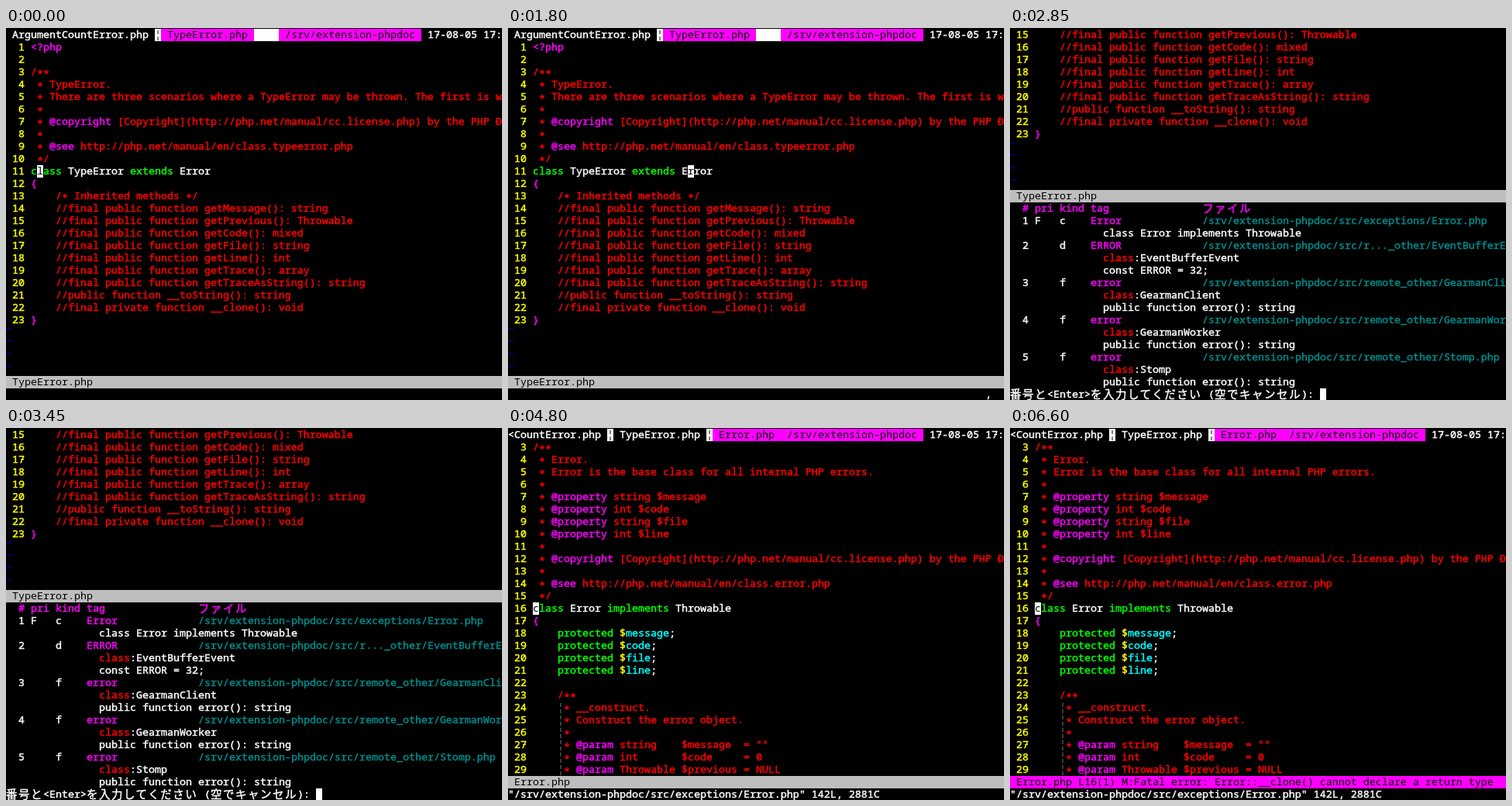
An HTML page that plays this animation: 640x480 px, repeating every 8100 ms.

```html
<!DOCTYPE html>
<html lang="ja">
<head>
<meta charset="utf-8">
<title>Tag jump in a terminal editor</title>
<style>
html, body { margin: 0; width: 100%; height: 100%; overflow: hidden; background: #000; }
#stage { position: absolute; left: 0; top: 0; width: 640px; height: 480px; overflow: hidden; background: #000; }
.screen { position: absolute; inset: 0; visibility: hidden; }
.run {
  position: absolute; height: 16px; white-space: pre;
  font: 400 13.3333px/14px "Noto Sans Mono", "DejaVu Sans Mono", monospace;
  font-variant-ligatures: none;
}
.light { -webkit-text-stroke: .45px currentColor; }
.wide { font: 400 14.5px/13px "Noto Sans CJK JP", "Noto Sans CJK", sans-serif; letter-spacing: 1.5px; }
.glyph { display: inline-block; position: relative; vertical-align: top; }
.low { top: 3px; }
.high { top: -4px; }
.seven { background: linear-gradient(currentColor, currentColor) 3px 7px / 4px 1px no-repeat; }
</style>
</head>
<body>
<div id="stage"></div>
<script>
const CELL = 8, ROW = 16, TOP = 1, LOOP = 8100;
const stage = document.getElementById('stage');

const INK = {
  w: '#fff', r: '#f00', m: '#f0f', y: '#ff0', g: '#0f0', c: '#0ff',
  t: '#008b8b', b: '#0000a0', d: '#555'
};
// Capital codes are black text on a filled background.
const FILL = { W: '#fff', M: '#f0f', S: '#bebebe' };
const GLYPHS = { '*': 'low', '~': 'high', '7': 'seven' };

function element(parent, className) {
  const node = document.createElement('div');
  node.className = className;
  parent.append(node);
  return node;
}

function fillGlyphs(node, text) {
  for (const part of text.split(/([*~7])/)) {
    if (!GLYPHS[part]) { node.append(part); continue; }
    const glyph = document.createElement('span');
    glyph.className = 'glyph ' + GLYPHS[part];
    glyph.textContent = part;
    node.append(glyph);
  }
}

const isWide = text => /[\u3000-\u9fff]/.test(text);

// Markup: "^g" switches to the colour with code g.
function put(screen, row, col, markup) {
  for (const [, code, body] of markup.matchAll(/\^(\w)([^^]*)/g)) {
    for (const text of body.match(/[\u3000-\u9fff]+|[^\u3000-\u9fff]+/g) || []) {
      const wide = isWide(text);
      const cells = text.length * (wide ? 2 : 1);
      const run = element(screen, wide ? 'run wide' : 'run');
      run.style.left = col * CELL + 'px';
      run.style.top = TOP + row * ROW + 'px';
      run.style.width = cells * CELL + 'px';
      run.style.color = INK[code] || '#000';
      if (FILL[code]) run.style.background = FILL[code];
      else run.classList.add('light');
      fillGlyphs(run, text);
      col += cells;
    }
  }
}

function listing(screen, lines, first, top) {
  lines.forEach((line, i) => {
    put(screen, top + i, 0, '^y' + String(first + i).padStart(3));
    put(screen, top + i, 4, line);
  });
}

function bar(screen, row, text, code = 'S') {
  put(screen, row, 0, '^' + code + (' ' + text).padEnd(80));
}

function tildes(screen, row) {
  for (let i = 0; i < 4; i++) put(screen, row + i, 0, '^b~');
}

const ROOT = '/srv/extension-phpdoc';
const CLOCK = `^M ${ROOT} ^w 17-08-05 17:`;
const COPYRIGHT = '^r * ^m@copyright^r [Copyright](http://php.net/manual/cc.license.php) by the PHP Ð';
const see = name => `^r * ^m@see^r http://php.net/manual/en/class.${name}.php`;
const comment = text => '^r * ' + text;
const property = text => `^r * ^m@property^r ${text}`;
const field = name => `^g    protected ^y$^c${name}^w;`;
const doc = text => '^w    ^d¦^r* ' + text;
const param = (type, name, value) =>
  doc('^m@param^r ' + type.padEnd(10) + name.padEnd(10) + '= ' + value);

const methods = [
  'final public function getMessage(): string',
  'final public function getPrevious(): Throwable',
  'final public function getCode(): mixed',
  'final public function getFile(): string',
  'final public function getLine(): int',
  'final public function getTrace(): array',
  'final public function getTraceAsString(): string',
  'public function __toString(): string',
  'final private function __clone(): void'
].map(text => '^r    //' + text);

function buildTypeError(screen) {
  put(screen, 0, 0, `^w ArgumentCountError.php ^W¦^M TypeError.php ^W    ${CLOCK}`);
  listing(screen, [
    '^m<?php', '', '^r/**',
    comment('TypeError.'),
    comment('There are three scenarios where a TypeError may be thrown. The first is w'),
    comment(''), COPYRIGHT, comment(''), see('typeerror'), '^r */',
    '^gclass ^wTypeError ^gextends ^wError', '^m{',
    '^r    /* Inherited methods */', ...methods, '^m}'
  ], 1, 1);
  tildes(screen, 24);
  bar(screen, 28, 'TypeError.php');
}

function buildTagList(screen) {
  listing(screen, [...methods.slice(1), '^m}'], 15, 0);
  tildes(screen, 9);
  bar(screen, 13, 'TypeError.php');
  put(screen, 14, 0, '^m  # pri kind tag');
  put(screen, 14, 31, '^mファイル');
  const signature = 'public function error(): string';
  const tags = [
    ['F', 'c', 'Error', 'exceptions/Error.php', '', 'class Error implements Throwable'],
    [' ', 'd', 'ERROR', 'r..._other/EventBufferE', 'EventBufferEvent', 'const ERROR = 32;'],
    [' ', 'f', 'error', 'remote_other/GearmanCli', 'GearmanClient', signature],
    [' ', 'f', 'error', 'remote_other/GearmanWor', 'GearmanWorker', signature],
    [' ', 'f', 'error', 'remote_other/Stomp.php', 'Stomp', signature]
  ];
  let row = 15;
  tags.forEach(([pri, kind, tag, path, owner, text], i) => {
    put(screen, row, 0, `^w  ${i + 1} ${pri}   ${kind}    ^m${tag}`);
    put(screen, row++, 31, `^t${ROOT}/src/${path}`);
    if (owner) put(screen, row++, 15, `^rclass^w:${owner}`);
    put(screen, row++, 15, '^w' + text);
  });
  put(screen, 29, 0, '^w番号と<Enter>を入力してください (空でキャンセル): ');
}

function buildError(screen) {
  put(screen, 0, 0, `^w<CountError.php ^W¦^w TypeError.php ^W¦^M Error.php ${CLOCK}`);
  listing(screen, [
    '^r/**', comment('Error.'),
    comment('Error is the base class for all internal PHP errors.'), comment(''),
    ...['string $message', 'int $code', 'string $file', 'int $line'].map(property),
    comment(''), COPYRIGHT, comment(''), see('error'), '^r */',
    '^gclass ^wError ^gimplements ^wThrowable', '^m{',
    ...['message', 'code', 'file', 'line'].map(field),
    '', '^r    /**', doc('__construct.'), doc('Construct the error object.'), doc(''),
    param('string', '$message', '""'),
    param('int', '$code', '0'),
    param('Throwable', '$previous', 'NULL')
  ], 3, 1);
  bar(screen, 28, 'Error.php');
  put(screen, 29, 0, `^w"${ROOT}/src/exceptions/Error.php" 142L, 2881C`);
}

function layer(build) {
  const node = element(stage, 'screen');
  build(node);
  return node;
}

const typeError = layer(buildTypeError);
const tagList = layer(buildTagList);
const error = layer(buildError);
const pendingKey = layer(s => put(s, 29, 77, '^w,'));
const answer = layer(s => put(s, 29, 50, '^w1'));
const warning = layer(s => bar(s, 28,
  'Error.php L16(1) M:Fatal error: Error::__clone() cannot declare a return type', 'M'));
const layers = [typeError, tagList, error, pendingKey, answer, warning];

const cursorAt = (row, col, char = ' ') => layer(s => put(s, row, col, '^W' + char));
const classLine = 'class TypeError extends Error';
const onClass = [5, 9, 14, 18, 22, 26, 29].map(col => cursorAt(11, col, classLine[col - 4]));
const prompt = cursorAt(29, 50);
const typed = cursorAt(29, 51);
const onError = cursorAt(14, 4, 'c');
layers.push(...onClass, prompt, typed, onError);

// Start time in ms, then the visible layers.
const steps = [
  [0, typeError, onClass[0]],
  ...onClass.slice(1).map((cursor, i) => [300 + i * 150, typeError, cursor]),
  [1800, typeError, onClass[6], pendingKey],
  [1950, tagList, prompt],
  [2550, tagList],
  [2850, tagList, prompt],
  [3300, tagList],
  [3450, tagList, prompt],
  [3900, tagList],
  [4200, tagList, answer, typed],
  [4800, error, onError],
  [5400, error],
  [5700, error, onError],
  [6600, error, onError, warning]
];

let current;
const start = performance.now();
function draw(now) {
  const time = Math.max(0, now - start) % LOOP;
  const step = steps.findLast(([at]) => at <= time);
  if (step !== current) {
    current = step;
    for (const node of layers) node.style.visibility = step.includes(node) ? 'visible' : 'hidden';
  }
  requestAnimationFrame(draw);
}
draw(start);
</script>
</body>
</html>
```
